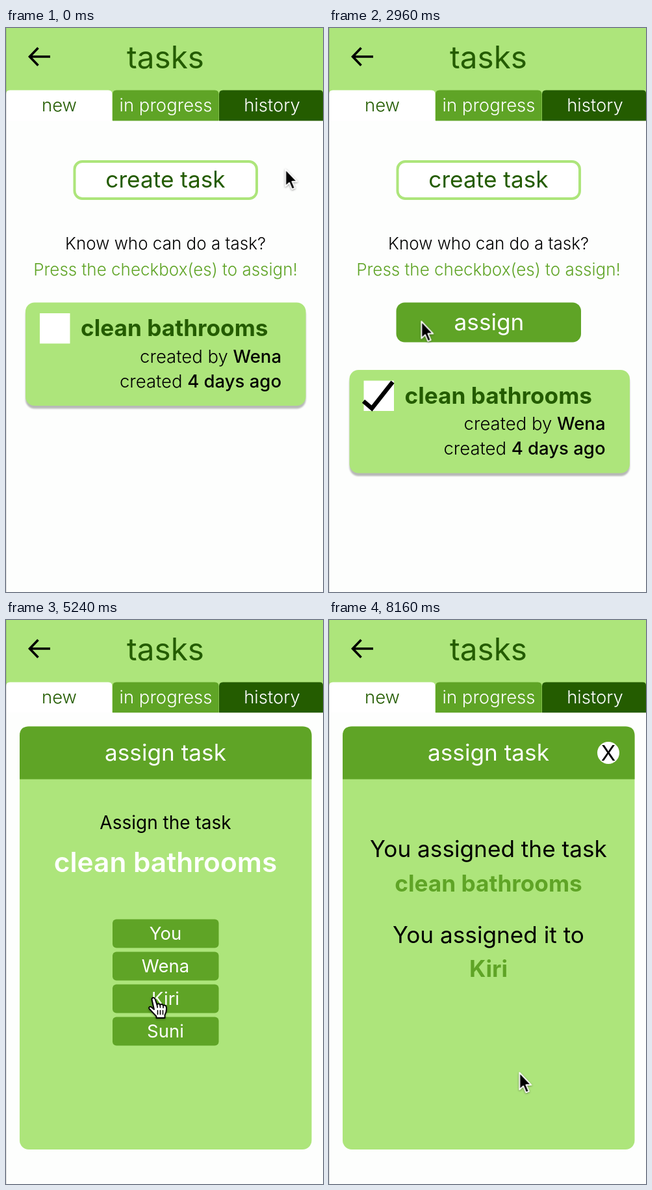
Write an HTML page that moves like this. It is 488 px wide and 866 px high and loops after 8200 ms.

```html
<!DOCTYPE html>
<html lang="en">
<head>
<meta charset="utf-8">
<title>Assign a task</title>
<style>
  :root { --light: #ade57b; --mid: #5fa426; --dark: #245c00; --paper: #fdfefd; }
  html, body { margin: 0; width: 100%; height: 100%; overflow: hidden; background: var(--paper); }
  svg { display: block; width: 100vw; height: 100vh; }
  text { font-family: Inter, "Open Sans", sans-serif; font-size: 27.5px; font-weight: 340; text-anchor: middle; }
  .light { fill: var(--light); }
  .mid { fill: var(--mid); }
  .dark { fill: var(--dark); }
  .white { fill: #fff; }
  .paper { fill: var(--paper); }
  .line { fill: none; stroke: #000; }
  .r { font-weight: 400; }
  .m { font-weight: 500; }
  .s { font-weight: 600; }
  .b { font-weight: 700; }
  .big { font-size: 35.2px; }
  .note { font-size: 26px; }
  .end { text-anchor: end; }
  .start { text-anchor: start; }

  /* Screen states: hard cuts */
  .scene, #arrow, #hand { visibility: hidden; animation: 8200ms step-end infinite; }
  #idle { animation-name: idle; }
  #checked { animation-name: checked; }
  #choose { animation-name: choose; }
  #picked { animation-name: picked; }
  #done { animation-name: done; }
  #modal { animation-name: modal; }
  @keyframes idle { 0% { visibility: visible } 11.22%, 100% { visibility: hidden } }
  @keyframes checked { 0% { visibility: hidden } 11.22% { visibility: visible } 40.24%, 100% { visibility: hidden } }
  @keyframes modal { 0% { visibility: hidden } 40.24%, 100% { visibility: visible } }
  @keyframes choose { 0% { visibility: hidden } 40.24% { visibility: visible } 90.24%, 100% { visibility: hidden } }
  @keyframes picked { 0% { visibility: hidden } 67.8% { visibility: visible } 90.24%, 100% { visibility: hidden } }
  @keyframes done { 0% { visibility: hidden } 90.24%, 100% { visibility: visible } }

  /* Pointer path and shape */
  #pointer {
    animation: travel 8200ms ease-in-out infinite;
    filter: drop-shadow(0 1.5px 1.5px rgba(0, 0, 0, .4));
  }
  @keyframes travel {
    0%, 1% { transform: translate(429.5px, 216px) }
    8.5%, 17% { transform: translate(60.5px, 455px) }
    28%, 52.4% { transform: translate(141.5px, 449.5px) }
    63.4%, 73.2% { transform: translate(226px, 580px) }
    82.3%, 91.5% { transform: translate(266px, 740px) }
    98.8%, 100% { transform: translate(292.5px, 694px) }
  }
  #arrow { animation-name: arrow; }
  #hand { animation-name: hand; }
  @keyframes arrow {
    0% { visibility: visible } 7% { visibility: hidden }
    11.22% { visibility: visible } 56.3% { visibility: hidden }
    77.6% { visibility: visible } 80.7% { visibility: hidden }
    90.24%, 100% { visibility: visible }
  }
  @keyframes hand {
    0% { visibility: hidden } 7% { visibility: visible }
    11.22% { visibility: hidden } 56.3% { visibility: visible }
    77.6% { visibility: hidden } 80.7% { visibility: visible }
    90.24%, 100% { visibility: hidden }
  }
</style>
</head>
<body>
<svg viewBox="0 0 488 866" preserveAspectRatio="none">
  <defs>
    <g id="card">
      <rect x="30" y="426.5" width="431.5" height="158" rx="14" fill="#000" opacity=".27" style="filter:blur(1px)"/>
      <rect class="light" x="30" y="421.5" width="431.5" height="158.5" rx="14"/>
      <rect class="white" x="52" y="438" width="46.5" height="46.5"/>
      <text class="big b dark start" x="115" y="473">clean bathrooms</text>
      <text class="end" x="424" y="513.5">created by <tspan class="m">Wena</tspan></text>
      <text class="end" x="424" y="551.5">created <tspan class="m">4 days ago</tspan></text>
    </g>
    <rect id="option" x="164" width="163.5" height="44" rx="6"/>
  </defs>

  <rect class="paper" width="488" height="866"/>
  <rect class="light" width="488" height="142"/>
  <path class="line" d="M68 44H37M49.5 30.5L36.5 44L49.5 57.5" stroke-width="3.6"/>
  <text class="r dark" x="245.5" y="61.5" style="font-size:47.6px">tasks</text>
  <path class="white" d="M0 142.5V101.5Q0 95.5 6 95.5H157.5Q163.5 95.5 163.5 101.5V142.5Z"/>
  <path class="mid" d="M164 142.5V101.5Q164 95.5 170 95.5H321.5Q327.5 95.5 327.5 101.5V142.5Z"/>
  <path class="dark" d="M328 142.5V101.5Q328 95.5 334 95.5H483Q488 95.5 488 100.5V142.5Z"/>
  <text class="dark" x="82" y="128">new</text>
  <text class="white" x="246" y="128">in progress</text>
  <text class="white" x="409.5" y="128">history</text>
  <rect width="1" height="866" opacity=".13"/>

  <rect x="105.5" y="205" width="280.5" height="57" rx="12" fill="#fff" stroke="#ade57b" stroke-width="4"/>
  <text class="big r dark" x="245.5" y="245">create task</text>
  <text class="note" x="245.5" y="340">Know who can do a task?</text>
  <text class="note mid" x="245.5" y="379.5">Press the checkbox(es) to assign!</text>

  <g id="idle" class="scene"><use href="#card"/></g>
  <g id="checked" class="scene">
    <rect class="mid" x="103.5" y="421.5" width="284.5" height="61" rx="13"/>
    <text class="big r white" x="246.5" y="463.5">assign</text>
    <g transform="translate(1.5 103.5)">
      <use href="#card"/>
      <path class="line" d="M51.5 469.5L64.5 480.5L96.5 440" stroke-width="6.5"/>
    </g>
  </g>

  <g id="modal" class="scene">
    <rect class="paper" x="1" y="142.5" width="487" height="723.5"/>
    <rect class="light" x="21" y="163.5" width="449.5" height="649.5" rx="14"/>
    <path class="mid" d="M21 244.5V177.5Q21 163.5 35 163.5H456.5Q470.5 163.5 470.5 177.5V244.5Z"/>
    <text class="big r white" x="245.5" y="216">assign task</text>
  </g>
  <g id="choose" class="scene">
    <text class="r" x="245.5" y="320.5" style="font-size:28px">Assign the task</text>
    <text class="s white" x="245.5" y="386.5" style="font-size:42.4px">clean bathrooms</text>
    <g class="mid">
      <use href="#option" y="459.5"/>
      <use href="#option" y="509.5"/>
      <use href="#option" y="559.5"/>
      <use href="#option" y="609.5"/>
    </g>
    <g class="white">
      <text class="r" x="245.5" y="491">You</text>
      <text class="r" x="245.5" y="541">Wena</text>
      <text class="r" x="245.5" y="590.5">Kiri</text>
      <text class="r" x="245.5" y="640.5">Suni</text>
    </g>
  </g>
  <g id="picked" class="scene">
    <use href="#option" y="559.5" class="white"/>
    <text class="r" x="245.5" y="590.5">Kiri</text>
    <rect x="142.5" y="732" width="207.5" height="46" rx="5" fill="#fff" stroke="#245c00" stroke-width="3"/>
    <text class="r dark" x="245.5" y="765">Finish</text>
  </g>
  <g id="done" class="scene">
    <circle class="white" cx="430" cy="204" r="17"/>
    <text class="r" x="430" y="216" style="font-size:33px">X</text>
    <text class="big r" x="245.5" y="364">You assigned the task</text>
    <text class="big b mid" x="245.5" y="416.5">clean bathrooms</text>
    <text class="big r" x="245.5" y="495.5">You assigned it to</text>
    <text class="big b mid" x="245.5" y="547.5">Kiri</text>
  </g>

  <g id="pointer" stroke-linejoin="round" stroke-linecap="round">
    <path id="arrow" d="M.8 1V27L6.6 21.6L10.8 31.5L15.2 29.6L11 19.8H18.8Z" stroke="#fff" stroke-width="1.9"/>
    <g id="hand" stroke="#000" stroke-width="1.9">
      <path fill="#fff" d="M-1.5 2.5C-1.5 -.5 2.5 -1 3.5 2L6.5 11C7.5 8.5 10.5 8.800 11.2 11.2C12.5 9.2 15.4 9.8 16 12C18 10.6 20.8 12 20.8 14.8C21.5 20 20.5 23 18.5 26.5V31H5.5V28.5C2 25 -1 21.5 -5 17.5C-7.5 14.5 -4 12.5 -1.5 15L2 18Z"/>
      <path fill="none" stroke-width="1.6" d="M7.5 19.5V25.5M11.5 19.5V25.5M15.5 19.5V25.5M6.5 11L7.2 15M11.2 11.5L11.5 15M16 12.5V15.5"/>
    </g>
  </g>
</svg>
</body>
</html>
```
